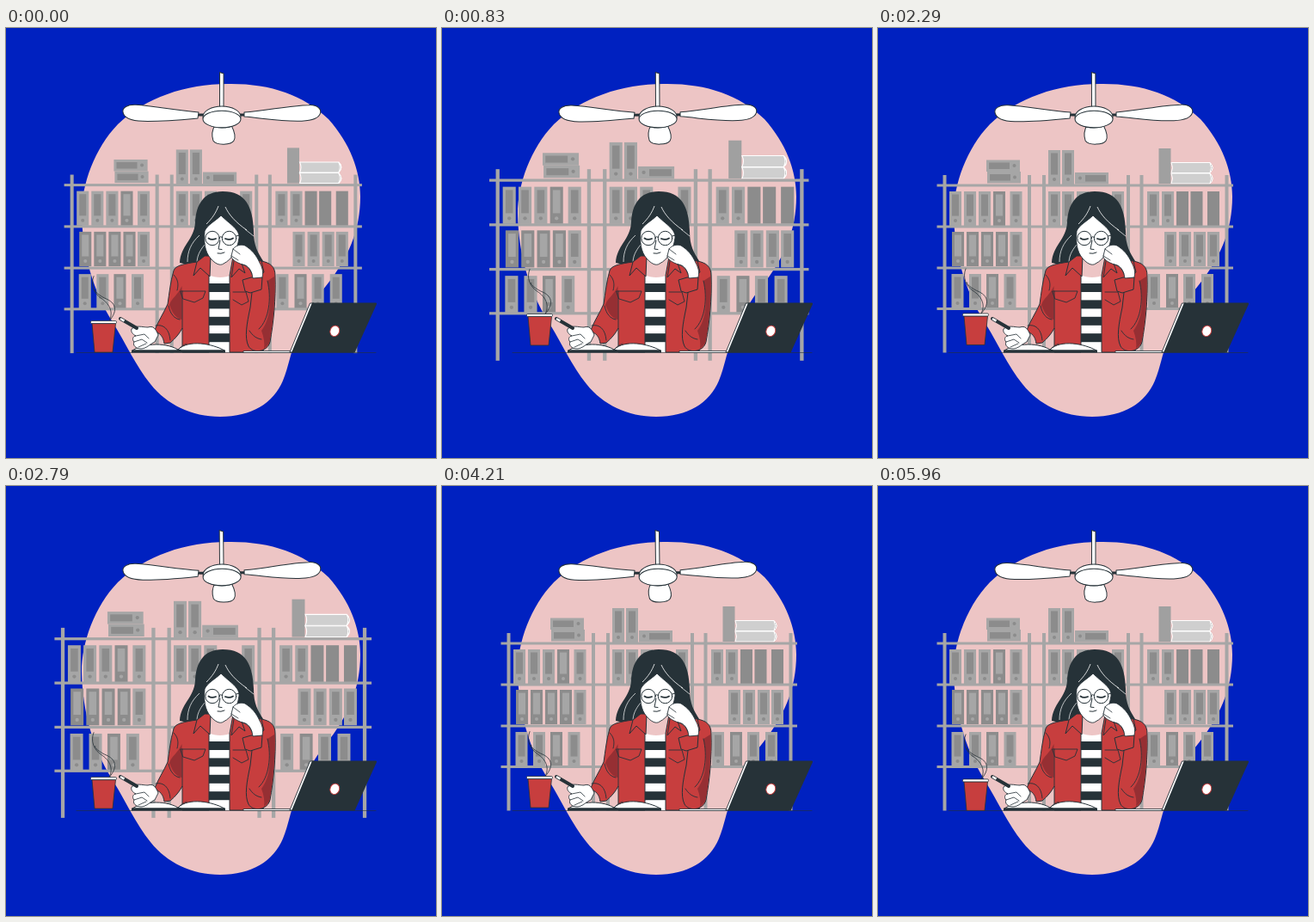
An HTML page for the animation above (6 s loop, 500x500 px).

```html
<!DOCTYPE html>
<html lang="en">
<head>
<meta charset="utf-8">
<title>Studying at the desk</title>
<style>
  html, body { margin: 0; width: 100%; height: 100%; overflow: hidden; background: #0021c0; }
  svg { display: block; width: 100%; height: 100%; }
  .line { fill: none; stroke: #263238; stroke-linecap: round; stroke-linejoin: round; }
  .white { fill: #fff; stroke: #263238; stroke-linejoin: round; }
  .red { fill: #c73e3e; stroke: #263238; stroke-linejoin: round; }
  .shade { fill: #962f33; }
  .dark { fill: #263238; }
  .book { fill: #cfcfcf; stroke: #fff; }
</style>
</head>
<body>
<svg viewBox="0 0 500 500">
  <rect width="500" height="500" fill="#0021c0"/>
  <path fill="#edc5c5" d="M262 65C212 64 163 80 130 112C103 140 88 182 88 216C89 263 101 305 124 342C140 368 151 393 168 414C187 438 216 452 249 452C286 452 311 436 322 410C329 393 330 379 338 361C347 338 357 318 372 300C398 268 412 235 412 196C412 166 400 134 375 106C346 78 308 65 262 65Z"/>

  <g id="shelf"></g>

  <g id="fan">
    <path class="white" d="M248.500 51.500L253 53V92H248.500Z"/>
    <path class="dark" d="M223 99.500H232V102.500H223ZM270 99.500H278V102.500H270Z"/>
    <path class="white" d="M224 98C198 96 174 91 151 89.500C141 89 135 93 136 98C137 104 145 108 159 108.500C182 109 202 107 223 105Z"/>
    <path class="white" d="M277 98C304 96 329 90 352 89.500C362 89 367 94 365.500 99C364 104 357 107.500 344 108C322 109 300 105 277 103Z"/>
    <path class="white" d="M243 113C240 118 239 125 241 131C245 137 262 136 265 131C268 126 265 119 262 113Z"/>
    <ellipse class="white" cx="251" cy="103.500" rx="22" ry="12.500"/>
    <ellipse class="white" cx="251" cy="106" rx="22" ry="9.800"/>
  </g>

  <path class="line" stroke-width=".6" d="M82 377.500H430"/>

  <g id="cup">
    <path class="line" stroke-width=".8" d="M120 341C130 330 128 321 118 316C106 311 101 304 104 305M120 341C126 330 119 320 111 315C102 309 98 299 102 289"/>
    <path class="red" stroke-width=".8" d="M100 344H127.500L124 377.500H103Z"/>
    <rect class="white" stroke-width=".8" x="98.500" y="341" width="30" height="3" rx="1.200"/>
  </g>

  <g id="student">
    <path class="dark" d="M252 190C230 190 221 205 220 226C219 246 203 253 202 273L232 280H276L299 271C293 261 288 254 288 236C287 208 279 190 252 190Z"/>
    <path fill="none" stroke="#fff" stroke-width=".7" d="M225 241C215 250 211 260 211 272M231 252C225 259 222 266 222 273M278 234L288 242"/>
    <path fill="#edc5c5" d="M238 262H266V290H235Z"/>
    <path fill="#fff" d="M235 287C244 291 254 291 263 287V377H235Z"/>
    <g class="dark" id="stripes"></g>

    <path class="red" d="M222 272C208 274 197 276 195 282C191 296 190 308 188 321C183 332 177 341 174 349L172 353C179 354 183 359 184 367L191 366C197 361 202 355 205 349V377H236V287L237 266Z"/>
    <path class="shade" d="M204.500 300C199 312 193 313 190 322C194 333 199 338 204.500 339Z"/>
    <path class="red" d="M264 266L260 288V377H299L306 280L297 271Z"/>
    <path class="red" d="M297 271C307 273 313 277 313 288C314 315 311 343 307 365C304 377 287 379 282 370C277 360 280 344 284 325L288 290L300 284Z"/>
    <path class="shade" d="M304 294C309 314 308 338 297 352C300 360 301 367 300 373L306 367C311 343 313 315 312 289Z"/>
    <path class="red" d="M275 293L285 290L298 290L297 304L284 308L278 306Z"/>
    <path class="red" d="M222 272L231 265L238 265L237 289L226 279L218 288ZM266 265L273 271L278 285L271 280L262 290Z"/>
    <path class="line" stroke-width=".9" d="M203 306H232L229 314L219 319L206 315ZM264 307H279L282 318L274 322L264 316M205 306V349M195 287C200 292 201 298 199 305M174 346C183 344 190 350 191 363M189 323C191 333 196 338 202 339M304 294C309 314 306 339 294 350M283 352C287 358 291 361 297 362"/>

    <path class="white" stroke-width=".9" d="M250 218C243 225 235 228 231 236C230 249 231 260 238 268C243 274 249 277 253 274C263 269 269 258 271 244C272 234 260 228 250 218Z"/>
    <path fill="none" stroke="#fff" stroke-width=".8" d="M247 207C244 215 240 221 233 228M255 208C259 217 267 226 280 235"/>
    <g class="line" stroke-width="1">
      <circle cx="240" cy="244.500" r="8.200"/>
      <circle cx="259.500" cy="244.500" r="8.200"/>
      <path d="M248 243.500Q249.500 241.500 251.500 243.500M267.500 242L272 241M249 247L247 257L251 257.500M246 262Q250 263 254 261"/>
      <path stroke-width="1.800" d="M235.500 244.500Q239 247 244 245M255 245Q260 247 264 244.500"/>
    </g>
    <path class="white" stroke-width=".9" d="M264 257C267 253 273 251 278 253C286 258 291 264 295 273C299 280 299 285 298 290L287 291C286 283 282 277 275 275C268 273 261 268 262 265Z"/>
    <path class="line" stroke-width=".8" d="M264 257L272 263M262 265L270 270M274 275C280 275 284 279 286 286"/>

    <path class="white" stroke-width="1" d="M147 375C157 368 183 364 200 374C212 362 240 367 254 375Z"/>
    <path class="line" stroke-width=".7" d="M200 374C204 370 207 368 210 367"/>
    <path class="dark" d="M146 374.500H198Q201 373 204 374.500H255V377.500H146Z"/>
    <path class="white" stroke-width=".9" d="M146 350C151 345 159 348 165 348C171 346 174 349 177 357L173 365C168 367 163 373 157 373C151 373 147 369 149 365C146 362 148 358 151 358C147 356 145 353 146 350Z"/>
    <path class="line" stroke-width=".8" d="M151 358L161 356L166 361M149 365L158 362L164 366M154 371L163 367"/>
    <path stroke="#263238" stroke-width="4" stroke-linecap="round" d="M133 338L152 349"/>
    <path stroke="#fff" stroke-width="2.500" d="M133 338L137.500 340.600"/>
  </g>

  <path class="white" stroke-width=".8" d="M276 375.500H331V377.500H276Z"/>
  <path class="white" stroke-width=".9" d="M353.500 320H358L335 377H330Z"/>
  <path class="dark" d="M356 319.500H430Q431.500 319.500 431 321L405.500 377.500H332Z"/>
  <ellipse cx="382.300" cy="352.300" rx="5.300" ry="6.300" fill="#fff" stroke="#c73e3e" stroke-width=".9" transform="rotate(22 382.300 352.300)"/>
</svg>

<script>
const byId = id => document.getElementById(id);
const GRAY = '#a6a6a6', DEEP = '#8c8c8c';

const rect = (x, y, w, h, fill) =>
  `<rect x="${x}" y="${y}" width="${w}" height="${h}" fill="${fill}"/>`;
const dot = (x, y, fill) => `<circle cx="${x}" cy="${y}" r="2" fill="${fill}"/>`;

function binder(x, y, h, inverted) {
  const [body, mark] = inverted ? [DEEP, GRAY] : [GRAY, DEEP];
  return rect(x, y, 14, h, body) + rect(x + 3, y + 3.5, 8, h - 15, mark) + dot(x + 7, y + h - 6, mark);
}
const row = (y, xs, inverted = []) =>
  xs.map((x, i) => binder(x, y, 40, inverted.includes(i))).join('');

function lyingBinder(x, y, labelX, dotX) {
  return rect(x, y, 39, 13.5, GRAY) + rect(labelX, y + 3, 24, 7.5, DEEP) + dot(dotX, y + 6.5, DEEP);
}
const lyingBook = y =>
  `<path class="book" d="M341 ${y}H386Q392 ${y + 6} 386 ${y + 12}H341Q344 ${y + 6} 341 ${y}Z"/>` +
  `<path fill="${GRAY}" stroke="#fff" d="M386 ${y}Q392 ${y + 6} 386 ${y + 12}Q389 ${y + 6} 386 ${y}Z"/>`;

byId('shelf').innerHTML =
  lyingBinder(126, 153.5, 129, 158.5) + lyingBinder(127, 167, 130, 159) +
  binder(198, 142, 40) + binder(214, 142, 40) + lyingBinder(229, 168, 241, 235) +
  rect(326.5, 140, 14, 41, '#a0a0a0') + lyingBook(156.5) + lyingBook(169) +
  row(190, [83, 100, 117, 134, 153.5, 198, 214, 231, 272, 313, 330], [3]) +
  [347, 363.5, 383].map(x => rect(x, 190, 14, 40, DEEP)).join('') +
  row(237, [86, 103, 120, 137, 153.5, 333, 350, 367, 383], [0, 1, 2, 3]) +
  row(286, [85.5, 106, 126, 146.5, 314, 335, 355, 376], [2, 5]) +
  [183, 231, 279, 326.5].map(y => rect(68.5, y - 1.5, 344.5, 3, GRAY)).join('') +
  [77.5, 176, 193, 291, 306.5, 405.5].map(x => rect(x - 2, 171, 4, 206.5, GRAY)).join('');

byId('stripes').innerHTML =
  [0, 1, 2, 3].map(i => `<rect x="236" y="${297 + i * 19.4}" width="24" height="10"/>`).join('');

// Linear interpolation through [position, value] stops.
function track(p, stops) {
  const i = Math.max(1, stops.findIndex(s => p <= s[0]));
  const [p0, v0] = stops[i - 1], [p1, v1] = stops[i];
  return v0 + (v1 - v0) * (p - p0) / (p1 - p0);
}

const LOOP = 6000, SWAY = 1500, LEAD = 30;
const BEAT = [[0, 1], [.1, 1.1], [.3, 1], [.4, 1], [.5, 1.1], [.6, 1], [1, 1]];
const TILT = [[0, 0], [.25, 1], [.75, -1], [1, 0]];
const LIFT = [[0, 0], [.5, -10], [1, 0]];

function draw(ms) {
  const t = (ms + LEAD) % LOOP, sway = t % SWAY / SWAY;
  const scale = track(t / LOOP, BEAT);
  byId('shelf').setAttribute('transform',
    `translate(240.8 258.5) scale(${scale}) translate(-240.8 -258.5)`);
  byId('fan').setAttribute('transform', `rotate(${track(sway, TILT)} 251 93.5)`);
  byId('cup').setAttribute('transform', `translate(0 ${track(sway, LIFT)})`);
}

const start = performance.now();
function tick() {
  draw(performance.now() - start);
  requestAnimationFrame(tick);
}
draw(0);
requestAnimationFrame(tick);
</script>
</body>
</html>
```
